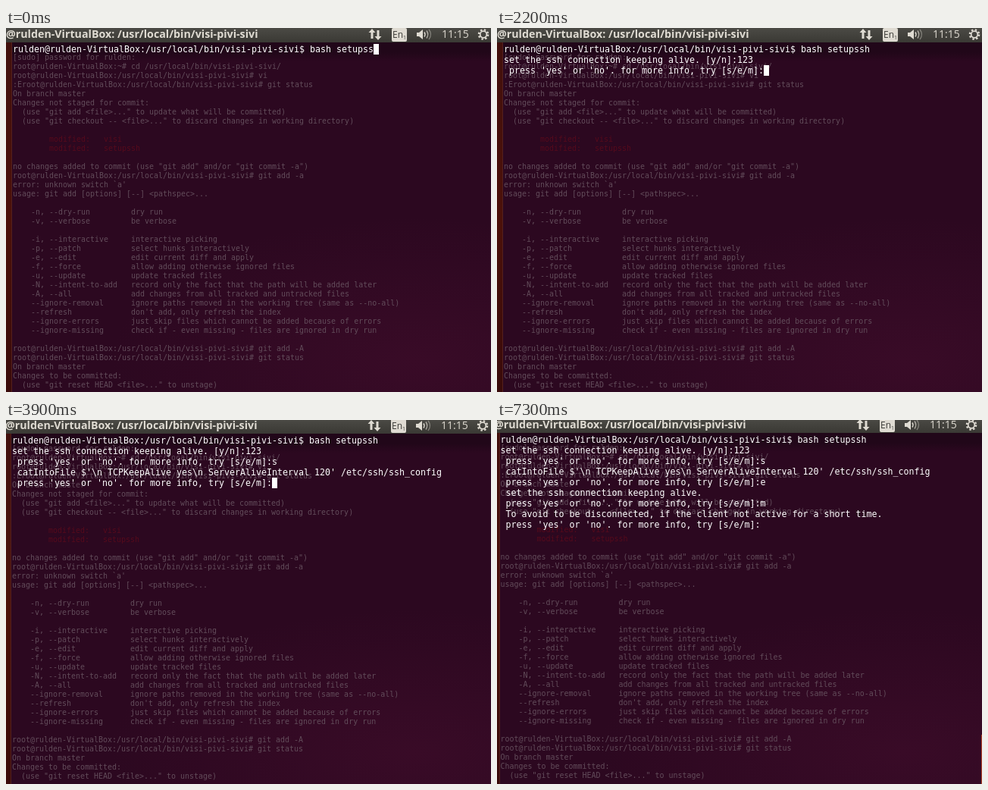
Recreate the animation shown at these times as an HTML page. Size 640 by 480 pixels, loop 8000 ms.

```html
<!DOCTYPE html>
<html lang="en">
<head>
<meta charset="utf-8">
<title>Terminal session</title>
<style>
html, body { margin: 0; width: 100%; height: 100%; overflow: hidden; background: #2c0820; }
#stage { position: absolute; left: 0; top: 0; width: 640px; height: 480px; overflow: hidden; }
#scene { position: absolute; left: 0; top: 0; width: 640px; height: 480px; }
#scene > * { position: absolute; }
#desk { left: -10px; top: -10px; width: 670px; height: 500px; background:
  radial-gradient(ellipse 400px 190px at 550px 450px, #390b27, #390b2700),
  linear-gradient(#210719 42px, #21071900 54px), #2c0820; }
#dock { left: -10px; top: 19px; width: 17px; height: 471px; background: linear-gradient(#42100c, #4c110a 50%, #380a0a); border-right: 1px solid #55201d; }
#edge { left: 643px; top: 417px; width: 4px; height: 70px; background: #b4452a; }
pre { margin: 0; left: 9px; font-family: "DejaVu Sans Mono", monospace; white-space: pre; }
#old { top: 33px; font-size: 9.975px; line-height: 12px; color: #624c5a; }
#old b { font-weight: 400; color: #560a1c; }
#now { top: 21px; font-size: 11.645px; line-height: 14px; color: #fff; }
#caret { width: 7px; height: 14px; background: #fff; }
#bar { left: -10px; top: -10px; }
</style>
</head>
<body>
<div id="stage"><div id="scene">
  <div id="desk"></div>
  <div id="dock"></div>
  <div id="edge"></div>
  <pre id="old"></pre>
  <pre id="now"></pre>
  <div id="caret"></div>
  <svg id="bar" width="670" height="29" viewBox="-10 -10 670 29" fill="#dfdbd2" font-family="Open Sans, sans-serif">
    <linearGradient id="shade" x2="0" y2="1"><stop offset=".35" stop-color="#4b4a45"/><stop offset="1" stop-color="#3a3934"/></linearGradient>
    <rect x="-10" y="-10" width="670" height="29" fill="url(#shade)"/>
    <text id="title" x="0" y="13" font-size="14.25" font-weight="700"></text>
    <path d="M483 1l4.5 5h-3v8h-3v-8h-3zM491 16l-4.500-5h3v-8h3v8h3z"/>
    <rect x="509" y="0" width="20" height="18" rx="2"/>
    <text x="510" y="13" font-size="12" fill="#3c3b37">En<tspan font-size="7" dy="2">1</tspan></text>
    <path d="M542 6h3l5-4v13l-5-4h-3z"/>
    <g fill="none" stroke="#dfdbd2" stroke-width="1.4">
      <path d="M552 5.5q2 3 0 6"/>
      <path d="M555 3.5q3.5 5 0 10" opacity=".7"/>
      <path d="M558 2q5 6.5 0 13" opacity=".4"/>
      <circle cx="630" cy="8.5" r="4.3" stroke-width="1.8"/>
      <circle cx="630" cy="8.5" r="6.2" stroke-width="2.2" stroke-dasharray="2.435"/>
    </g>
    <text x="575" y="13" font-size="14">11:15</text>
  </svg>
</div></div>
<script>
const $ = id => document.getElementById(id);
const host = "rulden-VirtualBox";
const path = "/usr/local/bin/visi-pivi-sivi";
const root = `root@${host}:${path}# `;
const option = (flag, help) => "    " + flag.padEnd(22) + help;
const changed = file => `<b>        modified:   ${file}</b>`;
const escape = s => s.replace(/<(?!\/?b>)/g, "&lt;");

$("title").textContent = `@${host}: ${path}`;
$("old").innerHTML = [
  "[sudo] password for rulden:",
  `root@${host}:~# cd ${path}/`,
  root + "vi",
  ":E" + root + "git status",
  "On branch master",
  "Changes not staged for commit:",
  '  (use "git add <file>..." to update what will be committed)',
  '  (use "git checkout -- <file>..." to discard changes in working directory)',
  "",
  changed("visi"),
  changed("setupssh"),
  "",
  'no changes added to commit (use "git add" and/or "git commit -a")',
  root + "git add -a",
  "error: unknown switch `a'",
  "usage: git add [options] [--] <pathspec>...",
  "",
  option("-n, --dry-run", "dry run"),
  option("-v, --verbose", "be verbose"),
  "",
  option("-i, --interactive", "interactive picking"),
  option("-p, --patch", "select hunks interactively"),
  option("-e, --edit", "edit current diff and apply"),
  option("-f, --force", "allow adding otherwise ignored files"),
  option("-u, --update", "update tracked files"),
  option("-N, --intent-to-add", "record only the fact that the path will be added later"),
  option("-A, --all", "add changes from all tracked and untracked files"),
  option("--ignore-removal", "ignore paths removed in the working tree (same as --no-all)"),
  option("--refresh", "don't add, only refresh the index"),
  option("--ignore-errors", "just skip files which cannot be added because of errors"),
  option("--ignore-missing", "check if - even missing - files are ignored in dry run"),
  "",
  root + "git add -A",
  root + "git status",
  "On branch master",
  "Changes to be committed:",
  '  (use "git reset HEAD <file>..." to unstage)'
].map(escape).join("\n");

const prompt = `rulden@${host}:${path}$ bash setupss`;
const ask = "set the ssh connection keeping alive. ";
const press = " press 'yes' or 'no'. for more info, try [s/e/m]:";
const session = [
  prompt + "h",
  ask + "[y/n]:123",
  press + "s",
  " catIntoFile $'\\n TCPKeepAlive yes\\n ServerAliveInterval 120' /etc/ssh/ssh_config",
  press + "e",
  " " + ask,
  press + "m",
  " To avoid to be disconnected, if the client not active for a short time."
];
// start time, finished lines, line being typed, view offset
const steps = [
  [0, 0, prompt, 0, 0],
  [500, 1, ask + "[y/n]:", 0, 0],
  [2200, 2, press, 0, 0],
  [3900, 4, press, -1, -1],
  [5600, 4, press + "e", -1, 1],
  [7300, 8, press, -4.5, -2]
];
let shown;

function draw(ms) {
  const step = steps.findLast(s => s[0] <= ms % 8000);
  if (step === shown) return;
  shown = step;
  const [, done, typed, x, y] = step;
  const last = step === steps.at(-1);
  $("now").textContent = [...session.slice(0, done), typed].join("\n");
  $("scene").style.left = x + "px";
  $("scene").style.top = y + "px";
  $("caret").style.left = 9 + 7 * typed.length + "px";
  $("caret").style.top = 21 + 14 * done + "px";
  $("caret").hidden = last;
  $("edge").hidden = !last;
}

const origin = performance.now();
function tick() {
  draw(performance.now() - origin);
  requestAnimationFrame(tick);
}
tick();
</script>
</body>
</html>
```
